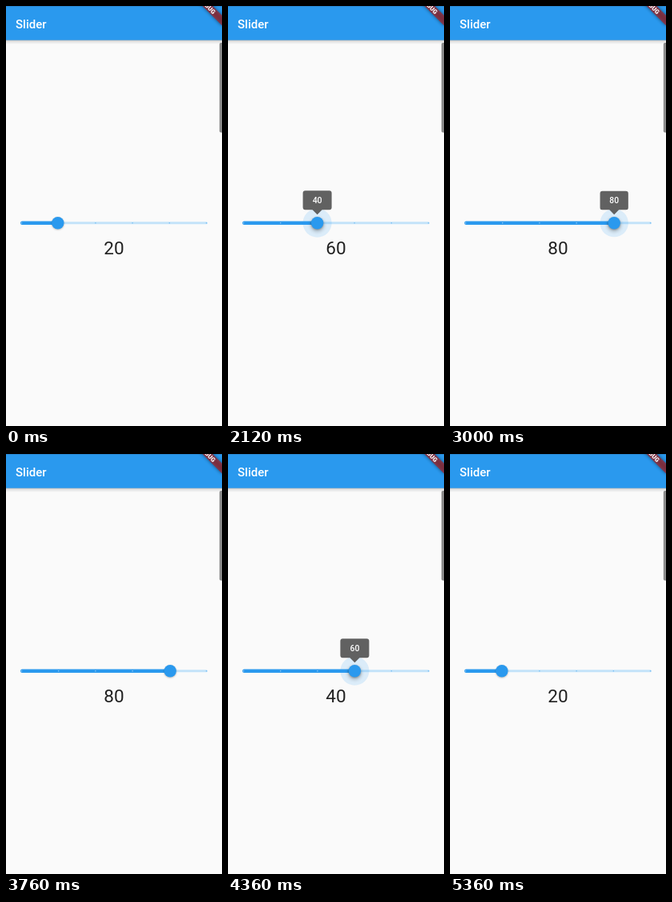
An HTML page that plays this animation: 270 by 526 pixels, repeating every 8.16 s.

```html
<!DOCTYPE html>
<html lang="en">
<head>
<meta charset="utf-8">
<title>Slider</title>
<style>
  html, body { margin: 0; width: 100%; height: 100%; overflow: hidden; background: #fafafa; }
  svg { display: block; width: 100%; height: 100%; font-family: Roboto, sans-serif; }
</style>
</head>
<body>
<svg viewBox="0 0 270 526">
  <defs>
    <linearGradient id="barShade" x2="0" y2="1">
      <stop offset="0" stop-opacity=".3"/>
      <stop offset=".4" stop-opacity=".1"/>
      <stop offset="1" stop-opacity="0"/>
    </linearGradient>
    <filter id="soft" x="-100%" y="-100%" width="300%" height="300%"><feGaussianBlur stdDeviation="2.2"/></filter>
    <filter id="thin" x="-100%" y="-100%" width="300%" height="300%"><feGaussianBlur stdDeviation="1"/></filter>
  </defs>

  <rect width="270" height="526" fill="#fafafa"/>
  <rect y="42" width="270" height="6" fill="url(#barShade)"/>
  <rect width="270" height="42.7" fill="#2a99ee"/>
  <rect width="270" height="1" fill="#2a87d0"/>
  <text x="12" y="27.5" font-size="15" font-weight="500" fill="#fff">Slider</text>

  <path d="M270 46h-1.2a2 2 0 0 0-2 2v108.500a2 2 0 0 0 2 2H270z" fill="#8b8b8b"/>

  <g transform="translate(270 -18) rotate(45)">
    <rect x="-30" y="21" width="60" height="9" opacity=".5" filter="url(#soft)"/>
    <rect x="-30" y="21" width="60" height="9" fill="#b71c1c" fill-opacity=".63"/>
    <text y="28.200" font-size="7.65" font-weight="900" fill="#fff" text-anchor="middle">DEBUG</text>
  </g>

  <rect x="18" y="270.200" width="234" height="3" rx="1.5" fill="#c3e3f9"/>
  <rect id="active" x="18" y="269.450" height="4.500" rx="2.250" fill="#2a99ee"/>
  <g id="ticks"></g>
  <g id="thumb">
    <circle id="halo" fill="#2a99ee" fill-opacity=".15"/>
    <circle id="lift" cy="2.500" r="8.500" filter="url(#soft)"/>
    <circle cy="1" r="7.600" opacity=".28" filter="url(#thin)"/>
    <circle r="7.700" fill="#2a99ee"/>
    <g id="tip">
      <path d="M0 0L-6-6H-15a3 3 0 0 1-3-3V-27a3 3 0 0 1 3-3H15a3 3 0 0 1 3 3V-9a3 3 0 0 1-3 3H6z" fill="#616161"/>
      <text id="label" y="-14.200" font-size="10.500" font-weight="500" fill="#fff" text-anchor="middle"></text>
    </g>
  </g>
  <text id="value" x="135" y="311" font-size="22.500" fill="#212121" text-anchor="middle"></text>
</svg>
<script>
  const LOOP = 8160, STEP = 40, MOVE = 100, TRACK_Y = 271.7;
  const START = 20;
  const moves = [[1600, 40], [2120, 60], [2658, 80], [3920, 60], [4360, 40], [4840, 20]];
  const presses = [[1560, 2990], [3760, 5200]];

  const el = id => document.getElementById(id);
  const clamp = v => Math.max(0, Math.min(1, v));
  const ease = u => u < .5 ? 2 * u * u : 1 - 2 * (1 - u) ** 2;
  const set = (node, attrs) => {
    for (const k in attrs) node.setAttribute(k, attrs[k]);
  };

  const ticks = [0, 20, 40, 60, 80, 100].map(v => {
    const dot = document.createElementNS('http://www.w3.org/2000/svg', 'circle');
    set(dot, { cx: 19.5 + 2.31 * v, cy: TRACK_Y, r: .75, 'fill-opacity': .54 });
    el('ticks').append(dot);
    return { v, dot };
  });

  function stateAt(t) {
    let pos = START, value = START, label = START;
    for (const [start, to] of moves) {
      if (t < start) break;
      pos += (to - value) * ease(clamp((t - start) / MOVE));
      value = to;
      if (t > start) label = to;
    }
    let press = 0;
    for (const [down, up] of presses) {
      press += clamp((t - down) / 100) - clamp((t - up) / 100);
    }
    return { pos, value, label, press: ease(press) };
  }

  function draw(t) {
    const { pos, value, label, press } = stateAt(t);
    const x = 18 + 2.34 * pos;
    set(el('active'), { width: x - 18 });
    set(el('thumb'), { transform: `translate(${x} ${TRACK_Y})` });
    set(el('halo'), { r: 18 * press });
    set(el('lift'), { opacity: .22 * press });
    set(el('tip'), {
      transform: `translate(0 -10.5) scale(${press})`,
      visibility: press > 0 ? 'visible' : 'hidden'
    });
    for (const { v, dot } of ticks) set(dot, { fill: v <= pos ? '#fff' : '#2a99ee' });
    el('label').textContent = label;
    el('value').textContent = value;
  }

  const begin = performance.now();
  function frame() {
    const t = (performance.now() - begin) % LOOP;
    draw(Math.floor(t / STEP) * STEP);
    requestAnimationFrame(frame);
  }
  frame();
</script>
</body>
</html>
```
